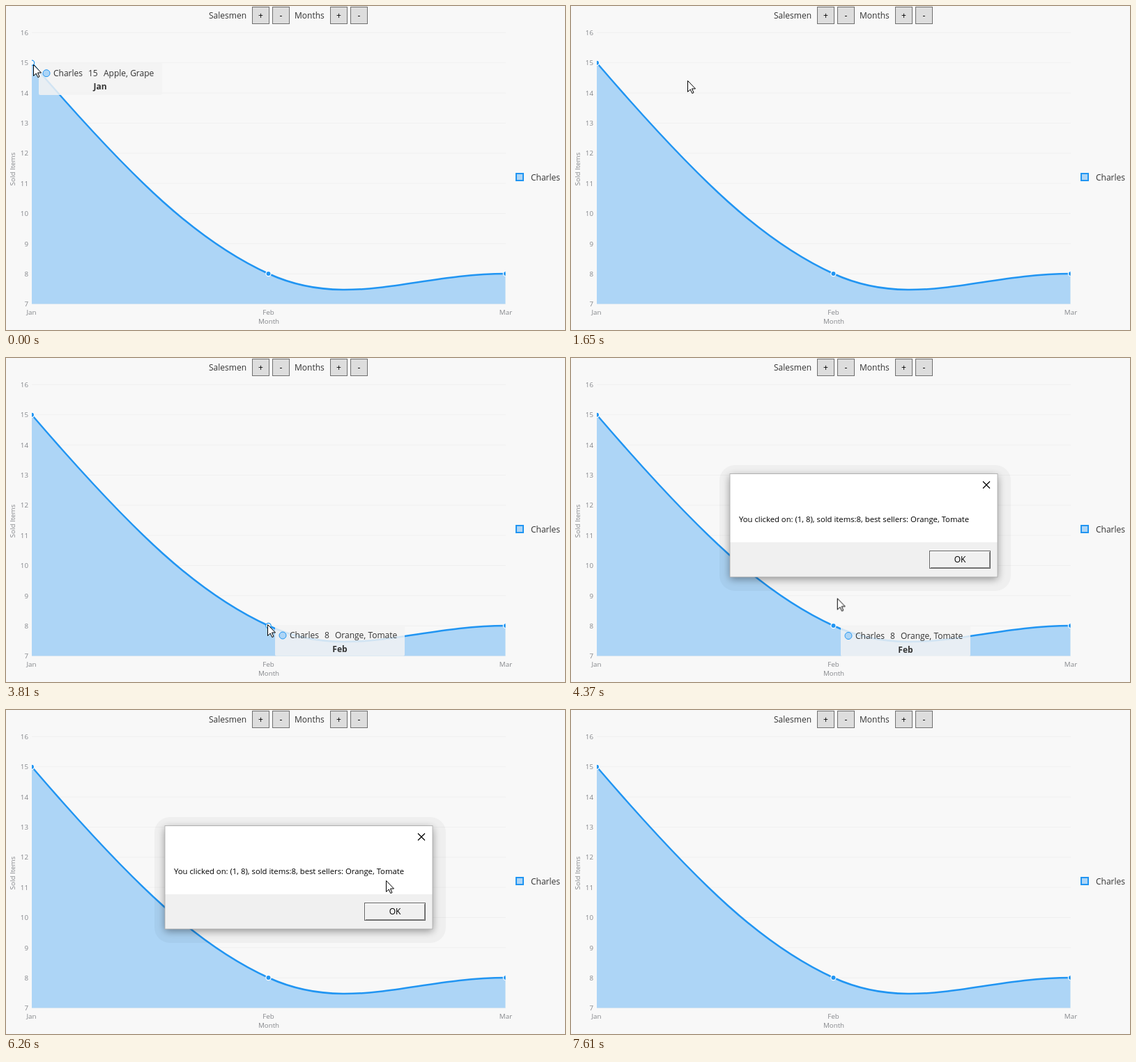
Animation of 802 by 466 pixels, one loop 8.38 s. Source, as an HTML page:

```html
<!DOCTYPE html>
<html lang="en">
<head>
<meta charset="utf-8">
<title>Sold items chart</title>
<style>
  html, body { margin: 0; width: 100%; height: 100%; overflow: hidden; background: #f8f8f8; }
  svg { display: block; width: 802px; height: 466px; font: 12px "Open Sans", "Noto Sans", sans-serif; fill: #333; }
  .axis { font-size: 9.8px; fill: #85878b; }
  .end { text-anchor: end; }
  .mid { text-anchor: middle; }
  .bold { font-weight: 700; }
  .grid { stroke: #f0f0f0; }
  .area { fill: #add5f6; }
  .line { fill: none; stroke: #2195f2; stroke-width: 2.5; }
  .dot { fill: #2195f2; stroke: #fff; stroke-width: 1.2; }
  .key { fill: #add5f6; stroke: #2195f2; }
  .button rect { fill: #ddd; stroke: #707070; }
  .button text { fill: #000; }
  .tip > rect { fill: rgba(243, 243, 243, .84); }
  .band { fill: rgba(0, 0, 0, .035); }
  .panel { filter: drop-shadow(0 3px 6px rgba(0, 0, 0, .4)); }
  .message { font-size: 11.3px; fill: #000; }

  .tip, .dot, .dialog, .pressed, .cursor { animation: 8380ms infinite; }
  .tip, .dot, .pressed { animation-timing-function: step-end; }
  .tip-jan { transform: translate(47px, 82px); animation-name: tip-jan; }
  .tip-feb { animation-name: tip-feb; }
  .jan { animation-name: hover-jan; }
  .feb { animation-name: hover-feb; }
  .pressed { animation-name: press; }
  .dialog { transform-origin: 420px 241px; animation-name: dialog; }
  .cursor { animation-name: cursor; animation-timing-function: linear; }

  @keyframes tip-jan {
    0% { visibility: visible; }
    17.9%, 100% { visibility: hidden; }
  }
  @keyframes tip-feb {
    0% { visibility: hidden; transform: translate(47px, 82px); }
    41.6% { visibility: visible; transform: translate(47px, 82px); animation-timing-function: ease-out; }
    44.4% { visibility: visible; transform: translate(386px, 384px); }
    50% { visibility: visible; transform: translate(387px, 384.5px); }
    63.2%, 100% { visibility: hidden; transform: translate(387px, 384.5px); }
  }
  @keyframes hover-jan {
    0% { fill: #fff; stroke: #2195f2; }
    8.4%, 100% { fill: #2195f2; stroke: #fff; }
  }
  @keyframes hover-feb {
    0%, 50%, 100% { fill: #2195f2; stroke: #fff; }
    41.5% { fill: #fff; stroke: #2195f2; }
  }
  @keyframes press {
    0%, 83.4%, 100% { opacity: 0; }
    80.79% { opacity: 1; }
  }
  @keyframes dialog {
    0%, 49.9% { opacity: 0; transform: scale(.92); }
    51.5%, 83.3% { opacity: 1; transform: none; }
    84.3%, 100% { opacity: 0; transform: scale(.96); }
  }
  @keyframes cursor {
    0%, 3.4% { transform: translate(39px, 84px); }
    3.82%, 7.28% { transform: translate(38px, 83px); }
    10.74% { transform: translate(80px, 97px); }
    17.06% { transform: translate(188px, 106px); }
    17.9% { transform: translate(186px, 107px); }
    19.69%, 20.17% { transform: translate(167px, 107px); }
    24.22%, 26.73% { transform: translate(127px, 109px); }
    27.57%, 30.31% { transform: translate(403px, 68px); }
    31.98% { transform: translate(440px, 38px); }
    34.96%, 37.95% { transform: translate(536px, 352px); }
    39.26%, 39.86% { transform: translate(397px, 398px); }
    41.53%, 50.2% { transform: translate(375px, 383px); }
    54% { transform: translate(388px, 310px); }
    59.31%, 60.02% { transform: translate(440px, 228px); }
    61.34%, 62.05% { transform: translate(469px, 224px); }
    65.1% { transform: translate(292px, 226px); }
    69.33%, 70.41% { transform: translate(602px, 250px); }
    74.7%, 75.18% { transform: translate(545px, 245px); }
    76.37% { transform: translate(500px, 268px); }
    78.4%, 83.41% { transform: translate(546px, 287px); }
    87.11%, 89.5% { transform: translate(668px, 393px); }
    90.7% { transform: translate(775px, 447px); }
    90.8%, 100% { transform: translate(860px, 500px); }
  }
</style>
</head>
<body>
<svg viewBox="0 0 802 466">
  <defs>
    <clipPath id="plot"><rect x="37" y="30" width="679.5" height="399"/></clipPath>
  </defs>

  <g id="toolbar">
    <text x="291" y="18">Salesmen</text>
    <text x="414" y="18">Months</text>
  </g>

  <g id="scale" class="axis"></g>
  <g class="axis mid">
    <text x="36.5" y="444">Jan</text>
    <text x="376.5" y="444">Feb</text>
    <text x="717" y="444">Mar</text>
    <text x="377" y="457">Month</text>
    <text transform="translate(13 234.5) rotate(-90)">Sold Items</text>
  </g>

  <g clip-path="url(#plot)">
    <path class="area" d="M37 81.7C186 255.5 277 339.5 376.5 385C490 437 585 385 717 385V428.5H37Z"/>
    <path class="line" d="M37 81.7C186 255.5 277 339.5 376.5 385C490 437 585 385 717 385"/>
    <circle class="dot jan" cx="37" cy="81.7" r="3.6"/>
    <circle class="dot feb" cx="376.5" cy="385" r="3.6"/>
    <circle class="dot" cx="717" cy="385" r="3.6"/>
  </g>

  <rect class="key" x="732" y="241" width="10" height="10" stroke-width="2"/>
  <text x="753" y="251">Charles</text>

  <g class="tip tip-jan">
    <rect width="177" height="46" rx="2"/>
    <circle class="key" cx="11" cy="14.7" r="5"/>
    <text x="21" y="19">Charles</text>
    <text x="71" y="19">15</text>
    <text x="93" y="19">Apple, Grape</text>
    <text class="mid bold" x="88" y="38">Jan</text>
  </g>
  <g class="tip tip-feb">
    <rect width="186" height="44.5" rx="2"/>
    <circle class="key" cx="11" cy="15" r="5"/>
    <text x="21" y="19.4">Charles</text>
    <text x="71" y="19.4">8</text>
    <text x="86" y="19.4">Orange, Tomate</text>
    <text class="mid bold" x="93" y="39">Feb</text>
  </g>

  <g class="dialog">
    <rect class="band" x="213" y="154" width="418" height="181" rx="22"/>
    <g class="panel">
      <rect x="228" y="167" width="384" height="148" fill="#fff"/>
      <rect x="228" y="265" width="384" height="50" fill="#f0f0f0"/>
    </g>
    <rect x="228" y="166.5" width="384" height="148.5" fill="none" stroke="#aaa" stroke-width=".8"/>
    <path d="M591 177.5l10 10m0-10l-10 10" stroke="#000" stroke-width="1.2"/>
    <text class="message" x="241" y="236">You clicked on: (1, 8), sold items:8, best sellers: Orange, Tomate</text>
    <rect x="514.5" y="277.5" width="87" height="25" fill="#f0f0f0" stroke="#646464"/>
    <path d="M515.5 301.5V278.5H600.5" fill="none" stroke="#fff"/>
    <path d="M516 301.5H600.5V279" fill="none" stroke="#808080"/>
    <text class="mid" x="558" y="294" fill="#000">OK</text>
    <g class="pressed">
      <rect x="515.5" y="278.5" width="85" height="23" fill="#f0f0f0" stroke="#a0a0a0"/>
      <text class="mid" x="559" y="295" fill="#000">OK</text>
    </g>
  </g>

  <path class="cursor" d="M.5 .5V16.5L4.2 13L6.8 18.6L9 17.6L6.5 12H11.5Z" fill="#fff" stroke="#000"/>
</svg>
<script>
  const scale = [];
  for (let value = 7; value <= 16; value++) {
    const y = 428.5 - (value - 7) * 43.35;
    scale.push(`<path class="grid" d="M37 ${y}H717"/><text class="end" x="32" y="${y + 3.7}">${value}</text>`);
  }
  document.getElementById("scale").innerHTML = scale.join("");

  const button = (x, label) => `<g class="button">
    <rect x="${x + .5}" y="1.5" width="24" height="24"/>
    <text class="mid" x="${x + 12.5}" y="18">${label}</text></g>`;
  document.getElementById("toolbar").innerHTML +=
    button(353, "+") + button(382, "-") + button(465, "+") + button(494, "-");
</script>
</body>
</html>
```
